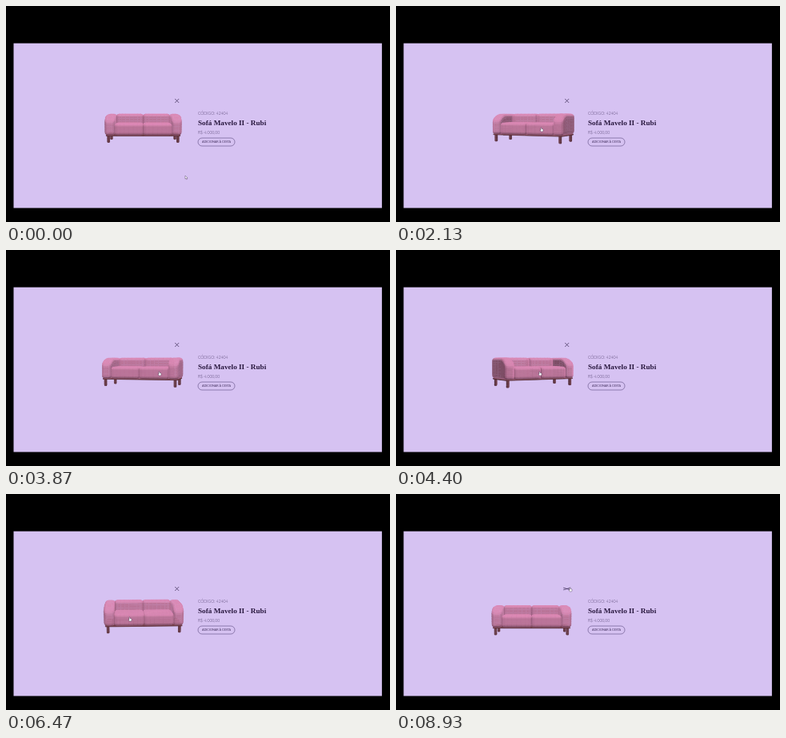
An HTML page with a canvas that plays this animation: 480 px wide and 270 px high, repeating every 8.99 s.

```html
<!DOCTYPE html>
<html lang="pt">
<head>
<meta charset="utf-8">
<style>
  html, body { margin: 0; width: 100%; height: 100%; overflow: hidden; background: #000; }
  svg, canvas { position: absolute; left: 0; top: 0; width: 480px; height: 270px; }
  text { font: 300 5.05px Lato, sans-serif; fill: #4d3d6a; }
  .title { font: bold 9.2px "Liberation Serif", serif; fill: #29183f; }
  .label { font-size: 3.75px; font-weight: 400; fill: #43315f; }
</style>
</head>
<body>
<svg viewBox="0 0 480 270">
  <rect x="9.5" y="46.6" width="460.4" height="205.9" fill="#d6c2f2"/>
  <text x="240" y="136">CÓDIGO: 42404</text>
  <text class="title" x="240" y="149.3">Sofá Mavelo II - Rubi</text>
  <text x="240" y="160">R$ 4.000,00</text>
  <rect x="240" y="165" width="46" height="10" rx="5" fill="none" stroke="#5d4a80" stroke-width=".6"/>
  <text class="label" x="263" y="171.4" text-anchor="middle">ADICIONAR À CESTA</text>
</svg>
<canvas id="stage"></canvas>
<script>
const canvas = document.getElementById('stage');
const ctx = canvas.getContext('2d');
const dpr = window.devicePixelRatio || 1;
canvas.width = 480 * dpr;
canvas.height = 270 * dpr;

const LOOP = 8990, HOVER_START = 8900, DISTANCE = 400;
const LIGHT = [0.1, 0.68, 0.72], SHEEN = 0.7;
const FABRIC = { dark: [104, 64, 84], light: [218, 138, 180], cells: 10 };
const WOOD = { dark: [66, 38, 48], light: [116, 64, 74], cells: 4 };
const FLOOR = -16.5, BASE = -7.5, TOP = 17.5;

const clamp = (v, min, max) => Math.max(min, Math.min(max, v));
const progress = (t, from, to) => clamp((t - from) / (to - from), 0, 1);
const ease = (t, from, to) => {
  const u = progress(t, from, to);
  return u * u * (3 - 2 * u);
};

// The sofa swings, turns to its side and back, tips forward, then settles lower.
function sofaPose(t) {
  const swing = 27 * Math.sin((clamp(t, 870, 3730) - 870) / 1800 * 2 * Math.PI);
  const turn = 104 * ease(t, 3870, 5070) - 87 * ease(t, 5070, 6470) - 3 * ease(t, 7100, 8300);
  const tip = Math.sin(Math.PI * progress(t, 6470, 7970)) ** 2;
  const grab = ease(t, 870, 1400), settle = ease(t, 7100, 8300);
  return {
    yaw: (swing + turn) * Math.PI / 180,
    pitch: (4 - 2 * grab + 10 * ease(t, 5070, 6470) + 16 * tip - 8 * settle) * Math.PI / 180,
    zoom: 0.965 + 0.035 * grab,
    x: 171.5 - 2 * settle,
    y: 152.5 + 5 * settle
  };
}

// Stops of the pointer: time, x, y
const STOPS = [
  [0, 224, 212], [730, 150, 154], [1400, 158, 152], [2730, 198, 152],
  [3870, 191, 152], [5070, 162, 152], [6470, 154, 154], [8300, 165, 150], [8670, 217, 117]
];
const pointerAt = t => STOPS.slice(1).reduce(([x, y], [time, nextX, nextY], i) => {
  const u = ease(t, STOPS[i][0], time);
  return [x + (nextX - x) * u, y + (nextY - y) * u];
}, STOPS[0].slice(1));

const subtract = (a, b) => a.map((v, i) => v - b[i]);
const dot = (a, b) => a[0] * b[0] + a[1] * b[1] + a[2] * b[2];
const cross = (a, b) => [
  a[1] * b[2] - a[2] * b[1],
  a[2] * b[0] - a[0] * b[2],
  a[0] * b[1] - a[1] * b[0]
];

// Rounded box as a list of quads; bend may reshape each point.
function box(min, max, radius, material, bend = p => p) {
  const { cells } = material;
  const center = min.map((v, i) => (v + max[i]) / 2);
  const half = min.map((v, i) => (max[i] - v) / 2);
  const place = p => {
    const inner = p.map((v, i) => clamp(v, radius - half[i], half[i] - radius));
    const out = subtract(p, inner), length = Math.hypot(...out);
    return bend(inner.map((v, i) => center[i] + v + out[i] / length * radius));
  };
  const quads = [];
  for (let axis = 0; axis < 3; axis++) for (const side of [-1, 1]) {
    const uAxis = (axis + 1) % 3, vAxis = (axis + 2) % 3;
    const spread = i => Math.sin((i / cells - 0.5) * Math.PI);
    const corner = (i, j) => {
      const p = [];
      p[axis] = side * half[axis];
      p[uAxis] = half[uAxis] * spread(i);
      p[vAxis] = half[vAxis] * spread(j);
      return place(p);
    };
    for (let i = 0; i < cells; i++) for (let j = 0; j < cells; j++) {
      const points = [corner(i, j), corner(i + 1, j), corner(i + 1, j + 1), corner(i, j + 1)];
      const across = cross(subtract(points[2], points[0]), subtract(points[3], points[1]));
      const length = Math.hypot(...across) || 1;
      quads.push({ points, side, material, normal: across.map(v => side * v / length) });
    }
  }
  return quads;
}

const slopeArm = ([x, y, z]) => {
  const t = Math.max(0, (z - 6) / 15);
  return [x, BASE + (y - BASE) * Math.sqrt(1 - 0.55 * t * t), z];
};

const frame = [];
for (const x of [-43, 43]) for (const z of [-18, 18])
  frame.push(box([x - 1.2, FLOOR, z - 1.2], [x + 1.2, BASE, z + 1.2], 0.4, WOOD));
frame.push(box([-46, BASE - 1, -20], [46, BASE, 20], 0.4, WOOD));

// Upright slices of the sofa, drawn from the farthest to the nearest.
const slices = [];
for (const side of [-1, 1]) {
  const part = (x0, x1, top, z0, z1, radius, bend) => {
    const [left, right] = side < 0 ? [-x1, -x0] : [x0, x1];
    return box([left, BASE, z0], [right, top, z1], radius, FABRIC, bend);
  };
  slices.push({ x: side * 41.5, parts: [part(35, 47.5, TOP, -21, 21, 4, slopeArm)] });
  slices.push({ x: side * 17.5, parts: [
    part(0, 35.5, TOP, -21, -9, 3),
    part(0, 35.5, 6.5, -10, 20.5, 3)
  ] });
}

function drawSofa({ yaw, pitch, zoom, x: cx, y: cy }) {
  const sinYaw = Math.sin(yaw), cosYaw = Math.cos(yaw);
  const sinPitch = Math.sin(pitch), cosPitch = Math.cos(pitch);
  const eye = [-sinYaw * cosPitch, sinPitch, cosYaw * cosPitch];
  const project = ([x, y, z]) => {
    const depth = z * cosYaw - x * sinYaw;
    const scale = zoom * DISTANCE / (DISTANCE - y * sinPitch - depth * cosPitch);
    return [
      cx + (x * cosYaw + z * sinYaw) * scale,
      cy - (y * cosPitch - depth * sinPitch) * scale
    ];
  };
  // Cloth looks brighter where it is seen at a flat angle.
  const shadeOf = normal => {
    const sheen = SHEEN * (1 - clamp(dot(normal, eye), 0, 1)) ** 2;
    return Math.min(1, Math.max(0, dot(normal, LIGHT)) + sheen);
  };
  const drawPart = quads => quads.forEach(({ points, side, material, normal }) => {
    const [p, q, r, s] = points.map(project);
    const area = (r[0] - p[0]) * (s[1] - q[1]) - (s[0] - q[0]) * (r[1] - p[1]);
    if (area * side >= 0) return;
    const shade = shadeOf(normal);
    const color = material.dark.map((v, i) => Math.round(v + (material.light[i] - v) * shade));
    ctx.beginPath();
    [p, q, r, s].forEach(point => ctx.lineTo(...point));
    ctx.closePath();
    ctx.fillStyle = ctx.strokeStyle = `rgb(${color})`;
    ctx.fill();
    ctx.stroke();
  });
  ctx.lineWidth = 0.3;
  ctx.lineJoin = 'round';
  frame.forEach(drawPart);
  const distance = slice => Math.abs(slice.x - DISTANCE * eye[0]);
  slices.sort((m, n) => distance(n) - distance(m))
    .forEach(slice => slice.parts.forEach(drawPart));
}

function drawCross(hover) {
  const dx = hover ? 4.5 : 2.5, dy = hover ? 1.3 : 2.5;
  ctx.beginPath();
  for (const s of [-1, 1]) {
    ctx.moveTo(213.7 - dx, 118.5 - dy * s);
    ctx.lineTo(213.7 + dx, 118.5 + dy * s);
  }
  ctx.strokeStyle = '#3a2a55';
  ctx.lineWidth = 0.7;
  ctx.stroke();
}

const ARROW = new Path2D('M0 0V4.2L1 3.3 1.7 4.8 2.4 4.4 1.8 3H3.1Z');
const HAND = new Path2D('M0 0H1V1.6L3 2V4L2.3 5H.3L-1 3H0Z');

function drawPointer([x, y], shape) {
  ctx.save();
  ctx.translate(x, y);
  ctx.fillStyle = '#fff';
  ctx.strokeStyle = '#40324f';
  ctx.lineWidth = 0.4;
  ctx.fill(shape);
  ctx.stroke(shape);
  ctx.restore();
}

const start = performance.now();
function draw() {
  const time = (performance.now() - start) % LOOP;
  const hover = time >= HOVER_START;
  const overSofa = time > 700 && time < 8500;
  ctx.setTransform(dpr, 0, 0, dpr, 0, 0);
  ctx.clearRect(0, 0, 480, 270);
  drawSofa(sofaPose(time));
  drawCross(hover);
  drawPointer(pointerAt(time), hover || overSofa ? HAND : ARROW);
  requestAnimationFrame(draw);
}
draw();
</script>
</body>
</html>
```
